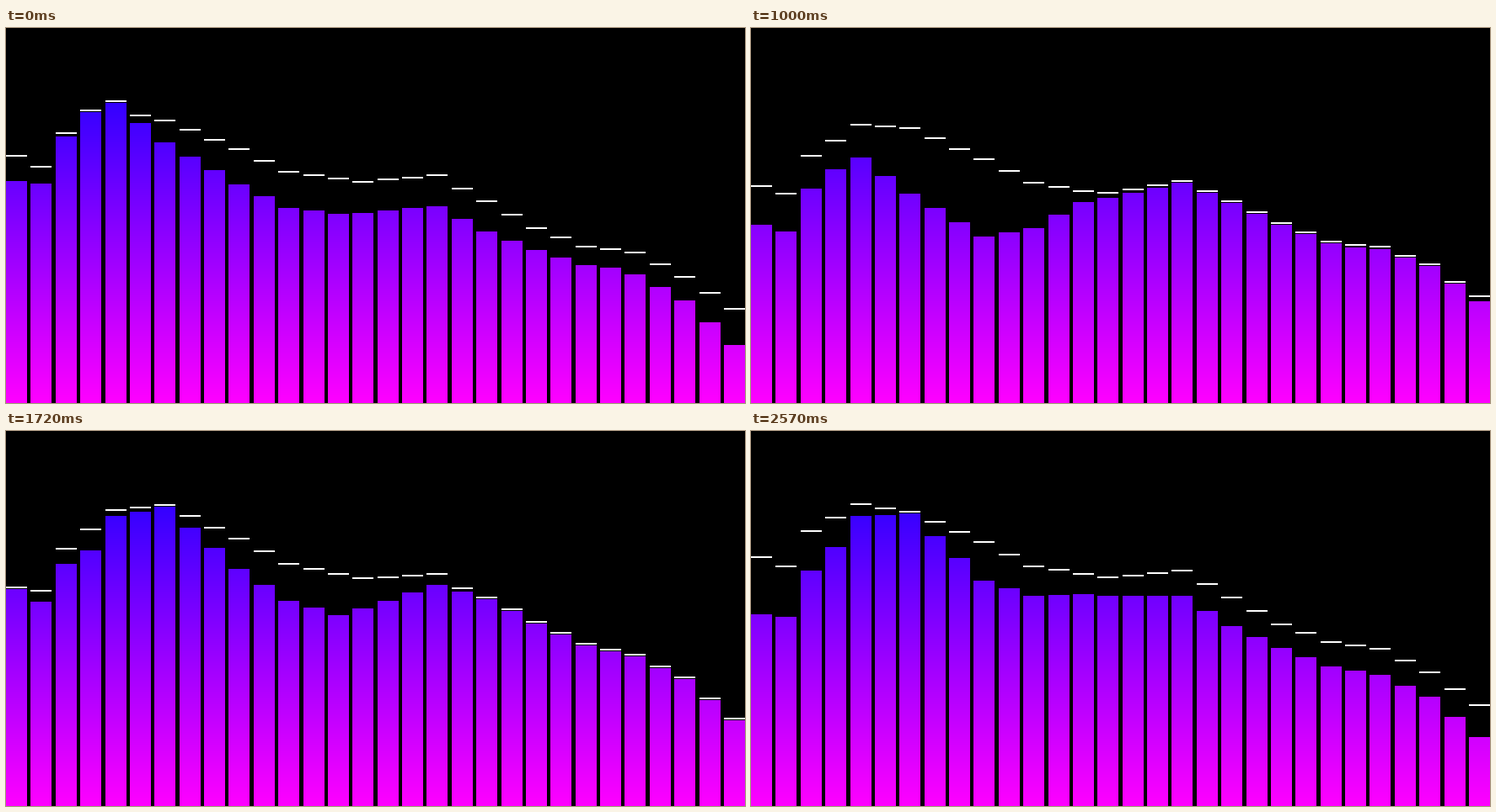
Write a matplotlib script that moves like this. It is 877x446 px and loops after 2.6 s.

```python
import numpy as np
import matplotlib.pyplot as plt
from matplotlib.animation import FuncAnimation
from matplotlib.patches import Rectangle

W, H = 877, 446
N, PITCH, BAR_W = 30, 29.379, 25
FRAMES, STEP = 65, 40
BEAT = 520          # ms
GRAVITY = 0.35      # cap acceleration, px per frame squared
REST = 2            # a resting cap's centre lies this far above its bar

idx = np.arange(N)
left = np.round(idx * PITCH).astype(int)

# Average spectrum of the bars, and of the caps that float above them
knots = [0, 1, 2, 4, 6, 9, 11, 14, 17, 21, 23, 25, 27, 29]
mean_top = np.interp(idx, knots, [198, 208, 159, 116, 142, 193, 208,
                                  200, 187, 240, 263, 273, 298, 345])
mean_cap = np.interp(idx, knots, [168, 178, 134, 100, 106, 142, 170,
                                  183, 174, 236, 257, 264, 292, 330])

# Each cue: frame, then how far bars and caps sag at a few band centres
TOP_BANDS = [0, 3, 6, 9, 13, 19, 24, 29]
CAP_BANDS = [0, 6, 13, 29]
CUES = [
    (0, [-16, -37, -6, -7, 18, 28, 17, 32], [-16, 4, 0, 4]),
    (10, [1, -1, -43, -31, 8, -11, -10, -11], [8, -9, 11, 2]),
    (25, [36, 30, 55, 55, 4, -6, -7, -20], [20, 13, 15, -11]),
    (35, [6, 28, 59, 59, -28, -10, -25, -35], [-3, 10, -10, -22]),
    (43, [-10, 4, -52, -29, 16, -14, -6, -1], [18, -18, -9, 13]),
    (56, [-34, -25, 32, -33, -7, -3, 16, 19], [-6, 9, 6, 18]),
    (64, [20, 0, -44, -15, -9, 18, 17, 19], [-18, -10, -9, -4]),
]

# Beat response of each bar and the highest point it may reach
bass_amp = 32 * np.exp(-((idx - 4) / 5) ** 2)
treble_amp = 55 * np.clip((idx - 12) / 17, 0, 1) ** 1.5
ceiling = 87 + 2 * np.abs(idx - 5)


def pose(top_sag, cap_sag):
    tops = np.maximum(mean_top + np.interp(idx, TOP_BANDS, top_sag), ceiling)
    caps = mean_cap + np.interp(idx, CAP_BANDS, cap_sag)
    return tops, np.minimum(caps, tops - REST)


def pulse(phase, peak):
    return 0.5 + 0.5 * np.cos(2 * np.pi * (phase - peak))


def beat(n):
    """Lift of the bars: low notes on the beat, high notes off it."""
    phase = n * STEP / BEAT
    return -bass_amp * pulse(phase, 0.12) - treble_amp * pulse(phase, 0.68)


def segment(a, b, start, end):
    """Tops and caps for every frame from a up to, but not including, b."""
    count = b - a
    rest_a, rest_b = start[0] - beat(a), end[0] - beat(b)
    tops, caps = [start[0]], [start[1]]
    cap, speed = start[1], np.zeros(N)
    for k in range(1, count + 1):
        top = rest_a + (rest_b - rest_a) * k / count + beat(a + k)
        top = np.clip(top, ceiling, 378)
        speed = speed + GRAVITY
        cap = cap + speed
        hit = cap > top - REST
        cap = np.where(hit, top - REST, cap)
        speed = np.where(hit, 0, speed)
        tops.append(top)
        caps.append(cap)
    # Spread the remaining error so the caps arrive exactly at the next cue
    drift = end[1] - cap
    return [(t, np.minimum(c + drift * k / count, t - REST))
            for k, (t, c) in enumerate(zip(tops, caps))][:-1]


track = []
for (a, *sag_a), (b, *sag_b) in zip(CUES, CUES[1:]):
    track += segment(a, b, pose(*sag_a), pose(*sag_b))
track.append(pose(*CUES[-1][1:]))

fig = plt.figure(figsize=(W / 64, H / 64), dpi=64, facecolor="black")
ax = fig.add_axes([0, 0, 1, 1])
ax.axis("off")

# Blue at the top of the stage, magenta at the bottom
gradient = np.zeros((H, 1, 3))
gradient[:, 0, 0] = (np.arange(H) + 0.5) / H
gradient[:, 0, 2] = 1
ax.imshow(gradient, extent=(0, W, H, 0), aspect="auto", interpolation="nearest")
ax.set_xlim(0, W)
ax.set_ylim(H, 0)


def block(x, w, h, color, z):
    return ax.add_patch(Rectangle((x, 0), w, h, facecolor=color, linewidth=0,
                                  antialiased=False, zorder=z))


# Black covers hide the gradient between the bars and above them
for x0, x1 in zip(left[:-1] + BAR_W, left[1:]):
    block(x0, x1 - x0, H, "black", 2)
covers = [block(x, BAR_W, 0, "black", 2) for x in left]
lines = [block(x, BAR_W, 2, "white", 3) for x in left]


def update(n):
    tops, caps = (np.round(v) for v in track[n])
    for cover, line, top, cap in zip(covers, lines, tops, caps):
        cover.set_height(top)
        line.set_y(cap - 1)
    return covers + lines


anim = FuncAnimation(fig, update, frames=FRAMES, interval=STEP, repeat=True,
                     repeat_delay=0, blit=False)
plt.show()
```
